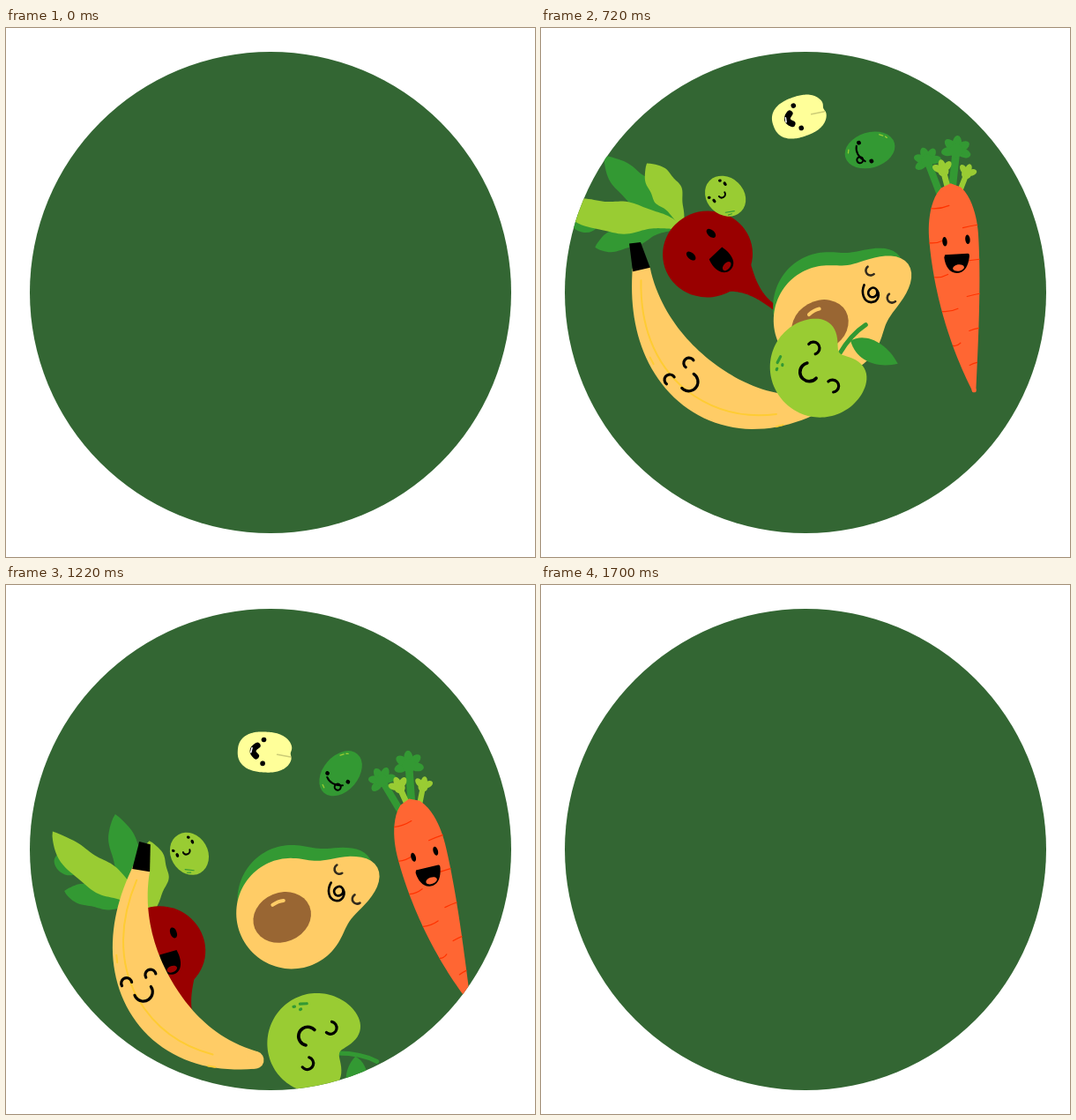
Animation of 600x600 px, one loop 1.76 s. Source, as an HTML page with a canvas:

```html
<!DOCTYPE html>
<html lang="en">
<head>
<meta charset="utf-8">
<title>Tossed vegetables</title>
<style>
html, body { margin: 0; width: 100%; height: 100%; overflow: hidden; background: #fff; }
canvas { display: block; width: 100vw; height: 100vh; }
</style>
</head>
<body>
<canvas id="stage" width="600" height="600"></canvas>
<script>
const ctx = document.getElementById('stage').getContext('2d');
const LOOP = 1760, STEP = 20, START = 80, END = 1700, RADIUS = 273;
const LEAF = '#339933', LIME = '#99cc33', FLESH = '#ffcc66', INK = '#000';
const { sin, cos, exp, sqrt, abs, max, PI } = Math;
const rad = deg => deg * PI / 180;
const mix = (a, b, u) => a + (b - a) * u;
const bump = (deg, spread) => exp(-((deg / spread) ** 2));

// ---- drawing helpers ----

function fillPoints(color, points) {
  ctx.beginPath();
  points.forEach(p => ctx.lineTo(...p));
  ctx.fillStyle = color;
  ctx.fill();
}

// Closed outline whose radius depends on the angle from its axis, in degrees
function polar(color, x, y, axis, radius) {
  const points = [];
  for (let d = -180; d < 180; d += 3) {
    const a = rad(d + axis), r = radius(d);
    points.push([x + r * cos(a), y + r * sin(a)]);
  }
  fillPoints(color, points);
}

// Band along a cubic curve; half(u) is half its width
function ribbon(color, [a, b, c, d], half) {
  const left = [], right = [];
  for (let i = 0; i <= 48; i++) {
    const u = i / 48, w = 1 - u;
    const at = k => w ** 3 * a[k] + 3 * w * w * u * b[k] + 3 * w * u * u * c[k] + u ** 3 * d[k];
    const dir = k => w * w * (b[k] - a[k]) + 2 * w * u * (c[k] - b[k]) + u * u * (d[k] - c[k]);
    const len = Math.hypot(dir(0), dir(1)), h = half(u);
    const nx = -dir(1) / len * h, ny = dir(0) / len * h;
    left.push([at(0) + nx, at(1) + ny]);
    right.unshift([at(0) - nx, at(1) - ny]);
  }
  fillPoints(color, left.concat(right));
}

// Wavy leaf that widens from its stalk
function leaf(color, curve, width) {
  ribbon(color, curve, u =>
    width * max(0, sin(PI * u ** 1.6)) ** 0.75 * (1 + 0.1 * sin(16 * u)) + 3 * (1 - u));
}

function shape(color, path) {
  ctx.fillStyle = color;
  ctx.fill(new Path2D(path));
}

function line(color, width, path) {
  ctx.strokeStyle = color;
  ctx.lineWidth = width;
  ctx.stroke(new Path2D(path));
}

function oval(color, x, y, rx, ry = rx, deg = 0) {
  ctx.beginPath();
  ctx.ellipse(x, y, rx, ry, rad(deg), 0, 7);
  ctx.fillStyle = color;
  ctx.fill();
}

function arc(x, y, r, from, to, width = 3.2, color = INK) {
  ctx.beginPath();
  ctx.arc(x, y, r, rad(from), rad(to));
  ctx.strokeStyle = color;
  ctx.lineWidth = width;
  ctx.stroke();
}

// Stalk with a fan of lobes at its upper end
function sprig(color, x, y, size, bx, by, lobes) {
  const dir = Math.atan2(y - by, x - bx);
  line(color, size * 0.62, `M${bx} ${by} L${x} ${y}`);
  for (let i = 0; i < lobes; i++) {
    const a = dir + (i - (lobes - 1) / 2) * 0.9, d = size * 0.62;
    oval(color, x + d * cos(a), y + d * sin(a), size * 0.6, size * 0.36, a * 180 / PI);
  }
  oval(color, x, y, size * 0.55);
}

// ---- characters ----

function drawChickpea() {
  polar('#ffff99', 291, 215, 0, d => {
    const a = rad(d);
    return (abs(cos(a) / 31) ** 2.4 + abs(sin(a) / 23) ** 2.4) ** (-1 / 2.4) - 2 * bump(d, 8);
  });
  line('#cccc77', 1.6, 'M305 217 L320 219');
  oval(INK, 289, 201, 2.8);
  oval(INK, 289, 228, 2.8);
  line(INK, 7, 'M282 208 Q273 214 281 220');
  line('#fff', 1.6, 'M276 211 L275 216');
}

function drawOlive() {
  oval(LEAF, 361.5, 252, 29, 20, 10);
  oval(INK, 354, 239, 2.4);
  oval(INK, 357.5, 264, 2.4);
  line(INK, 2, 'M350 241 C346 246 346 254 351 261');
  arc(346.5, 257, 3.5, 0, 360, 2);
  line(LIME, 1.3, 'M379 241 L382 244 M384 246 L385 248 M338 244 L340 241');
}

function drawPea() {
  oval(LIME, 212, 268.5, 25, 21, 48);
  for (const [x, y] of [[207, 250.5], [193.5, 269]]) {
    oval(INK, x, y, 1.9, 1.6);
    oval(INK, x + 5.5, y + 4, 1.7, 2.5, -35);
  }
  arc(208, 266, 4, -30, 145, 2);
  line(LEAF, 1.2, 'M211 287 L221 286 M214 290 L218 289');
}

function drawBeet() {
  oval(LEAF, 62, 292, 15, 11, 15);
  leaf(LEAF, [[170, 310], [138, 298], [105, 316], [71, 321]], 13);
  leaf(LEAF, [[174, 306], [148, 280], [124, 266], [93, 219]], 17);
  leaf(LIME, [[172, 308], [166, 280], [158, 265], [140, 233]], 16);
  leaf(LIME, [[172, 312], [140, 285], [88, 302], [34, 263]], 17);
  oval('#990000', 197, 343, 51, 49);
  ribbon('#990000', [[222, 366], [238, 380], [250, 398], [266, 412]], u => 3 + 27 * (1 - u) ** 2.4);
  oval(INK, 178, 343, 3.7, 6.3, -42);
  oval(INK, 203.5, 320, 3.7, 6.3, -42);
  shape(INK, 'M198 349 L214 337 C220 342 225 349 225 355 C225 363 217 368 210 365 C204 362 200 356 198 349 Z');
  oval('#990000', 217, 359, 6, 3.6, -42);
}

function carrotHalf(u) {
  const dome = u < 0.25 ? sqrt(1 - (1 - u / 0.25) ** 2) : 1;
  const taper = u > 0.25 ? 0.92 * ((u - 0.25) / 0.75) ** 1.8 : 0;
  return 28 * (dome - taper);
}

function drawCarrot() {
  sprig(LEAF, 440, 151, 13, 453, 187, 5);
  sprig(LEAF, 473, 140, 14, 468, 180, 5);
  sprig(LIME, 458, 163, 11, 463, 184, 3);
  sprig(LIME, 484, 167, 10, 477, 184, 3);
  ribbon('#ff6633', [[466, 177], [468, 256], [473, 335], [488, 412]], carrotHalf);
  oval('#ff6633', 488, 412, 2.6);
  for (let i = 0; i < 10; i++) {
    const u = 0.12 + i * 0.083, side = i % 2 ? 1 : -1, half = carrotHalf(u);
    const y = 177 + 235 * u, x = 467 + 20 * u * u + side * half;
    const inner = x - side * half * (i % 3 ? 0.6 : 0.85);
    line('#ff3300', 1.2, `M${x} ${y} Q${(x + inner) / 2} ${y + 1} ${inner} ${y - side * -3}`);
  }
  oval(INK, 458, 243, 2.7, 5.2, -5);
  oval(INK, 484, 241, 2.7, 5.2, -5);
  shape(INK, 'M458 258 L484 257 C486 257 486 260 485 264 C483 274 478 279 471 279 C463 279 458 271 457 261 Z');
  oval('#ff6633', 473, 273, 6.5, 3.7, -8);
}

function drawAvocado() {
  const pear = neck => d => 62 - 11 * cos(rad(d)) + neck * bump(d, 27);
  polar(LEAF, 335, 305, -33, pear(38));
  polar(FLESH, 335, 320, -33, pear(49));
  oval('#996633', 316, 331, 33.5, 28, -27);
  line(FLESH, 4, 'M304 318 Q310 313 316 312');
  arc(376, 271, 5.5, 50, 235, 2.6, '#332b1d');
  arc(399, 303, 5.5, 50, 235, 2.6, '#332b1d');
  line(INK, 2.6, 'M368 287 C364 295 366 306 375 307 C384 307 386 297 381 292 C377 288 370 294 373 299 C376 304 384 300 382 294');
}

function drawBanana() {
  const spine = [[125, 274], [118, 380], [190, 470], [304, 452]];
  ribbon(FLESH, spine, u => 10 + 19.5 * sin(PI * u ** 1.1));
  oval(FLESH, 304, 452, 10);
  shape(INK, 'M115 245 L128 245 L135 275 L115 277 Z');
  line('#ffcc33', 2, 'M123 288 C116 335 124 382 158 418 C184 444 218 458 256 458 M122 376 L125 384 M254 472 L262 471');
  arc(141, 404, 6, 135, 335);
  arc(165, 388, 6, 135, 335);
  arc(162, 409, 10.5, -50, 145);
}

function drawApple() {
  line(LEAF, 5, 'M356 430 C368 421 380 414 397 411');
  shape(LEAF, 'M374 421 C392 418 411 438 413 466 C390 462 371 446 374 421 Z');
  polar(LIME, 322, 437, -14, d => 56 + 8 * cos(rad(d)) - 28 * bump(d, 26));
  line(LEAF, 3.2, 'M288 411 L294 406 M284 418 L285 417 M292 416 L292.5 415');
  arc(332, 412, 7, -115, 95);
  arc(335, 460, 7, -110, 105);
  arc(317, 435, 10.5, 65, 280, 3.6);
}

// ---- motion ----

// Each throw eases out to its top pose at time `peak`, then falls from it.
// Poses are [x, y, turn]; the list runs back to front.
const throws = [
  { draw: drawChickpea, pivot: [291, 215], peak: 845,
    from: [287, 595, 77], top: [293, 87, -22], to: [297, 620, 108] },
  { draw: drawOlive, pivot: [361, 252], peak: 860,
    from: [330, 610, 105], top: [374, 123, -31], to: [403, 619, -185] },
  { draw: drawBeet, pivot: [197, 343], peak: 740,
    from: [232, 740, 29], top: [189, 256, -6.5], to: [135, 886, 105] },
  { draw: drawPea, pivot: [212, 268], peak: 772,
    from: [221, 577, 23], top: [209, 188, -4], to: [205, 687, 64] },
  { draw: drawCarrot, pivot: [470, 270], peak: 876,
    from: [407, 821, 34], top: [473, 247, -2.5], to: [508, 740, -52] },
  { draw: drawAvocado, pivot: [335, 320], peak: 897,
    from: [335, 666, -37], top: [335, 309, -0.7], to: [323, 671, 34] },
  { draw: drawBanana, pivot: [152.5, 395], peak: 838,
    from: [250, 937, -140], top: [154, 375, -4], to: [134, 735, 90] },
  { draw: drawApple, pivot: [335, 436], peak: 757,
    from: [217, 717, -108], top: [321.5, 383, -23], to: [465, 965, 225] }
];

function poseAt({ from, top, to, peak }, t) {
  const rising = t < peak;
  const u = (t - peak) / ((rising ? START : END) - peak);
  return top.map((v, i) => mix(v, (rising ? from : to)[i], u * u));
}

function render(t) {
  ctx.fillStyle = '#fff';
  ctx.fillRect(0, 0, 600, 600);
  oval('#336633', 300, 300, RADIUS);
  if (t < START || t >= END) return;
  ctx.save();
  ctx.beginPath();
  ctx.arc(300, 300, RADIUS, 0, 7);
  ctx.clip();
  ctx.lineCap = 'round';
  for (const item of throws) {
    const [x, y, turn] = poseAt(item, t);
    ctx.save();
    ctx.translate(x, y);
    ctx.rotate(rad(turn));
    ctx.translate(-item.pivot[0], -item.pivot[1]);
    item.draw();
    ctx.restore();
  }
  ctx.restore();
}

const begin = performance.now();
function tick() {
  const t = (performance.now() - begin) % LOOP;
  render(Math.floor(t / STEP) * STEP);
  requestAnimationFrame(tick);
}
tick();
</script>
</body>
</html>
```
